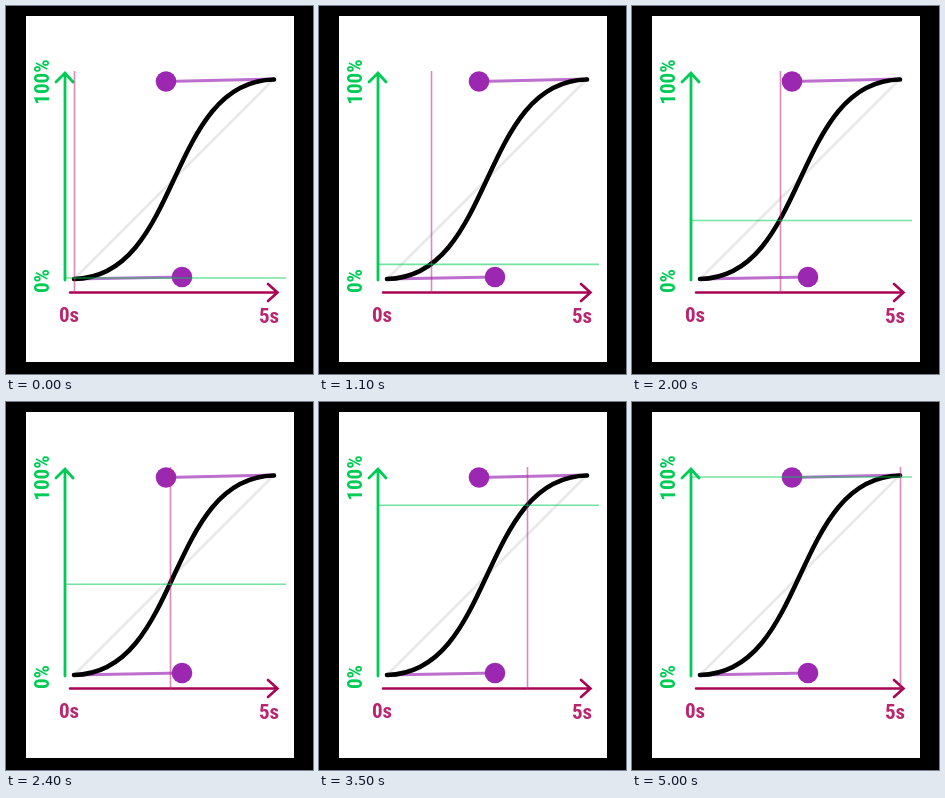
An HTML page for the animation above (5.1 s loop, 307 px wide and 368 px high).

```html
<!DOCTYPE html>
<html lang="en">
<head>
<meta charset="utf-8">
<title>Easing curve</title>
<style>
  html, body { margin: 0; height: 100%; overflow: hidden; background: #000; }
  svg { display: block; }
  path, line { fill: none; stroke-linecap: round; }
  text {
    font: 900 21px Impact, "Roboto Condensed", "Open Sans", "Noto Sans", sans-serif;
    font-stretch: condensed;
    text-anchor: middle;
  }
  .time { fill: #b8266f; }
  .progress { fill: #00cc55; }
  .guide { stroke-linecap: butt; stroke-width: 1.6; stroke-opacity: .55; }
</style>
</head>
<body>
<svg width="307" height="368" viewBox="0 0 307 368">
  <rect x="20" y="10" width="268" height="346" fill="#fff"/>
  <path d="M68 273L268 73" stroke="#e9e9e9" stroke-width="2.5"/>

  <g stroke="#bd6fcd" stroke-width="3">
    <path d="M68 273L176 271M160 75.5L268 73"/>
  </g>
  <g fill="#9c27b0">
    <circle cx="176" cy="271" r="10.3"/>
    <circle cx="160" cy="75.5" r="10.3"/>
  </g>
  <path d="M68 273C176 271 160 75.5 268 73.5" stroke="#000" stroke-width="4.6"/>

  <path d="M59 274V68M50 76L59 67L67 76" stroke="#00cc55" stroke-width="2.8"/>
  <path d="M64 286.5H271M262 278L271.5 286.5L262 295" stroke="#a80555" stroke-width="2.6"/>

  <text class="time" x="63" y="316">0s</text>
  <text class="time" x="263" y="317">5s</text>
  <text class="progress" transform="translate(43 275) rotate(-90)">0%</text>
  <text class="progress" transform="translate(43 76) rotate(-90)">100%</text>

  <line id="now" class="guide" y1="65" y2="287" stroke="#c42a7c"/>
  <line id="value" class="guide" x1="58" x2="280" stroke="#00cc55"/>
</svg>
<script>
const STEP = 100, STEPS = 50;
const now = document.getElementById("now");
const value = document.getElementById("value");

// Cubic bezier (.55, 0, .45, 1), solved for x by bisection.
function ease(x) {
  let lo = 0, hi = 1, t;
  for (let i = 0; i < 24; i++) {
    t = (lo + hi) / 2;
    const bx = 1.65 * t * (1 - t) ** 2 + 1.35 * t * t * (1 - t) + t ** 3;
    if (bx < x) lo = t; else hi = t;
  }
  return t * t * (3 - 2 * t);
}

function place(line, axis, pos) {
  line.setAttribute(axis + 1, pos);
  line.setAttribute(axis + 2, pos);
}

function draw() {
  const step = Math.floor(performance.now() / STEP) % (STEPS + 1);
  const p = step / STEPS;
  place(now, "x", 68.5 + 200 * p);
  place(value, "y", 272 - 197 * ease(p));
  requestAnimationFrame(draw);
}
draw();
</script>
</body>
</html>
```
